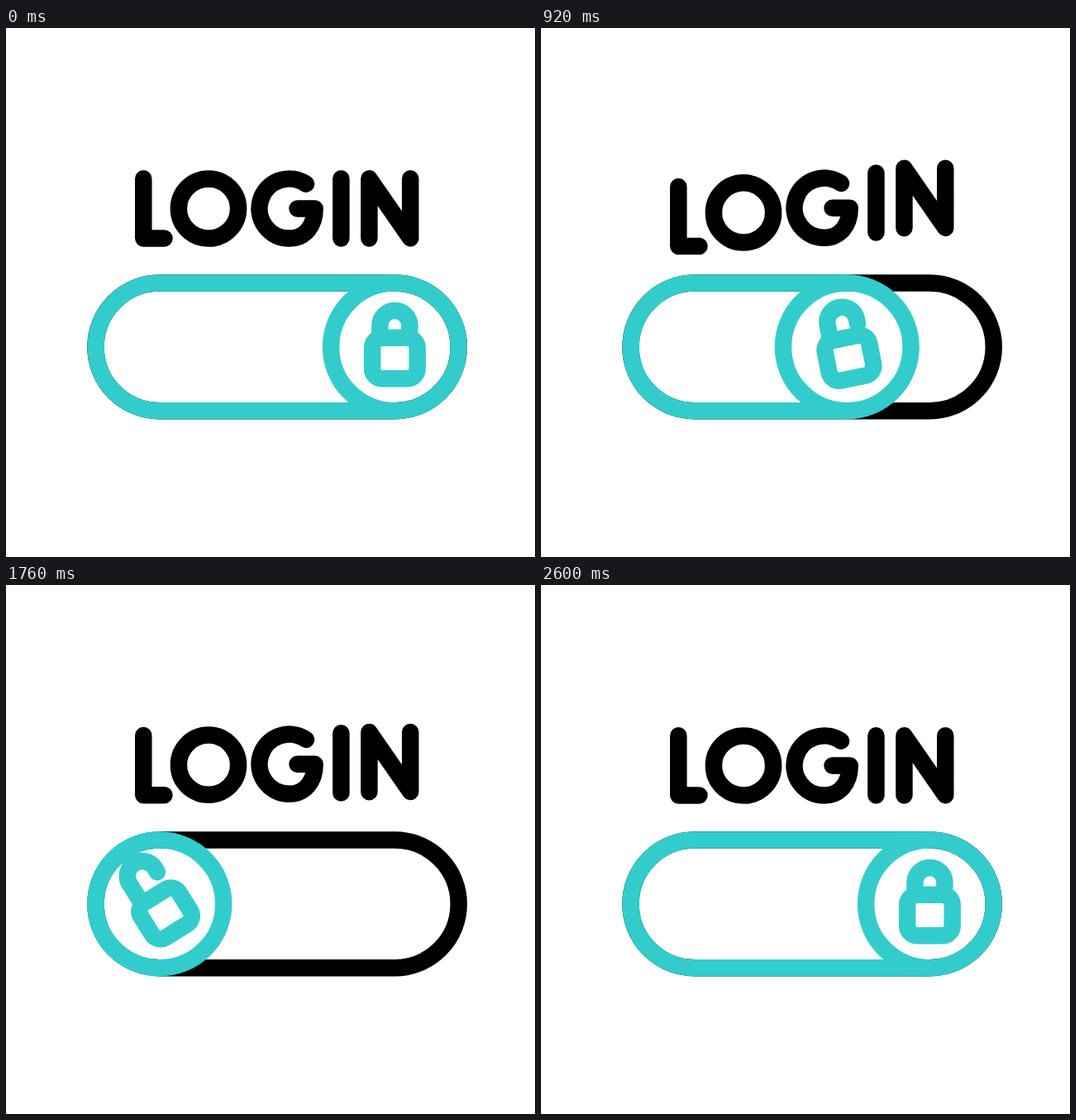
An HTML page that plays this animation: 640x640 px, repeating every 2820 ms.

```html
<!DOCTYPE html>
<html lang="en">
<head>
<meta charset="utf-8">
<title>Login switch</title>
<style>
html, body { margin: 0; width: 100%; height: 100%; overflow: hidden; background: #fff; }
svg { display: block; width: 100%; height: 100%; }
</style>
</head>
<body>
<svg viewBox="0 0 640 640" fill="none" stroke="#000" stroke-width="20.5" stroke-linecap="round" stroke-linejoin="round">
  <g id="letters">
    <path d="M166.3 182.3V254.5H191.5"/>
    <circle cx="245" cy="218.5" r="36.1"/>
    <path d="M363 188.7A36.1 36.1 0 1 0 342.7 254.6C362 254.6 373.7 239 373.7 218.5H352.5"/>
    <path d="M405.4 182.3V254.5"/>
    <path d="M439.4 254.5V182.3L489.2 254.2V182.3"/>
  </g>
  <rect x="108.5" y="308.6" width="439.2" height="154.6" rx="77.3"/>
  <g stroke="#3cc">
    <path id="trail" stroke-linecap="butt"/>
    <g id="knob">
      <circle r="77.3"/>
      <g id="lock">
        <rect x="-27.25" y="-11.2" width="54.5" height="49.5" rx="12"/>
        <path id="shackle"/>
      </g>
    </g>
  </g>
</svg>
<script>
const LOOP = 2820, STEP = 20;
const LEFT = 185.9, RIGHT = 470.4, MID = 385.9;
const $ = id => document.getElementById(id);
const letters = [...$('letters').children];

// Eased value at time t between [time, value] keys
function track(t, keys) {
  if (t <= keys[0][0]) return keys[0][1];
  for (let i = 1; i < keys.length; i++) {
    const [t0, a] = keys[i - 1], [t1, b] = keys[i];
    if (t < t1) {
      const x = (t - t0) / (t1 - t0);
      return a + (b - a) * x * x * (3 - 2 * x);
    }
  }
  return keys[keys.length - 1][1];
}

const bounce = [[200, 0], [600, -19.5], [1000, 13], [1400, -6.5], [1800, 0]];
const slide = [[600, 0], [1400, 1], [1800, 1], [2220, 0.56], [2600, 0]];

function draw(t) {
  letters.forEach((el, i) =>
    el.setAttribute('transform', `translate(0 ${track(t - 50 * i, bounce)})`));

  const open = track(t, slide);
  const x = RIGHT + (LEFT - RIGHT) * open;
  const arcY = -25.8 - 14 * open;
  $('trail').setAttribute('d', `M${x} 308.6H${LEFT}a77.3 77.3 0 0 0 0 154.6H${x}`);
  $('knob').setAttribute('transform', `translate(${x} ${MID})`);
  $('lock').setAttribute('transform', `rotate(${-32 * open})`);
  $('shackle').setAttribute('d', `M-18 -11.2V${arcY}a18 18 0 0 1 36 0v5.5`);
}

const start = performance.now();
function tick() {
  const t = (performance.now() - start) % LOOP;
  draw(Math.floor(t / STEP) * STEP);
  requestAnimationFrame(tick);
}
tick();
</script>
</body>
</html>
```
